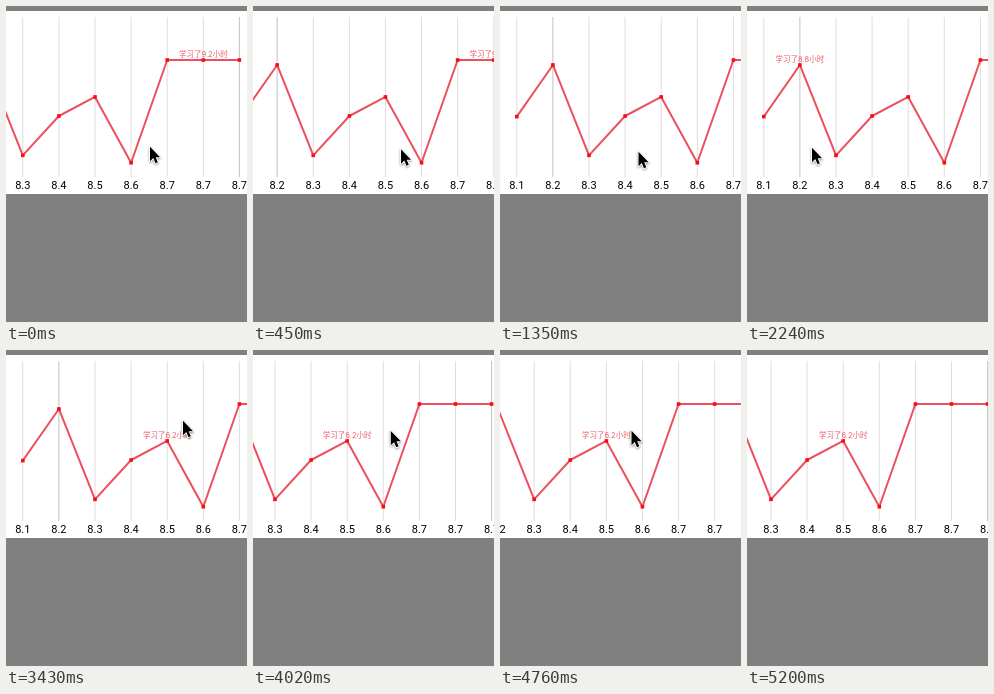
These frames come from a looping animation (241x316 px, 5.85 s). An HTML page:

```html
<!DOCTYPE html>
<html lang="zh">
<head>
<meta charset="utf-8">
<style>
  html, body { margin: 0; width: 100%; height: 100%; overflow: hidden; background: #808080; }
  svg { display: block; width: 241px; height: 316px; }
  text { text-anchor: middle; }
  .day { font: 11px Roboto, Arial, sans-serif; fill: #000; }
  .tip { font: 7.5px Inter, "Noto Sans CJK SC", "Noto Sans CJK", sans-serif; fill: #ee5b69; }
  #cursor { paint-order: stroke; filter: drop-shadow(0 1px 1px rgba(0, 0, 0, .4)); }
</style>
</head>
<body>
<svg viewBox="0 0 241 316">
  <rect width="241" height="316" fill="#808080"/>
  <rect y="5" width="241" height="183" fill="#fff"/>
  <g id="chart"></g>
  <path id="cursor" d="M.5 .8V15.2L3.8 12.1L6 17.2L8.3 16.2L6.2 11.2H10.6Z"
        fill="#000" stroke="#fff" stroke-width="1.8" stroke-linejoin="round"/>
</svg>
<script>
const LOOP = 5850, TICK = 148.5, GAP = 36.1;
const MIN = -55.4, MAX = 16.8, RANGE = MAX - MIN;
const hours = [4.6, 8.8, 1.45, 4.65, 6.2, 0.85, 9.2, 9.2, 9.2];

const px = i => i * GAP;
const py = i => 167.2 - 12.3 * hours[i];
const day = i => '8.' + Math.min(i + 1, 7);

const chart = document.getElementById('chart');
const cursor = document.getElementById('cursor');

function add(tag, attrs, text) {
  const el = document.createElementNS('http://www.w3.org/2000/svg', tag);
  for (const key in attrs) el.setAttribute(key, attrs[key]);
  if (text) el.textContent = text;
  return chart.appendChild(el);
}

hours.forEach((_, i) => add('rect', {
  x: px(i) - 0.5, y: 11, width: 1, height: 160, fill: i % 7 === 1 ? '#c2c2c2' : '#dedede'
}));
add('polyline', {
  points: hours.map((_, i) => `${px(i)},${py(i)}`).join(' '),
  fill: 'none', stroke: '#ec4f5e', 'stroke-width': 2, 'stroke-linejoin': 'round'
});
hours.forEach((_, i) => {
  add('rect', { x: px(i) - 1.8, y: py(i) - 1.8, width: 3.6, height: 3.6, fill: '#f80d12' });
  add('text', { x: px(i), y: 183, class: 'day' }, day(i));
});
const tip = add('text', { class: 'tip' });

const smooth = p => p * p * (3 - 2 * p);
const speedUp = p => p ** 3.8;

// Progress from 0 to 1 between two ticks
function glide(t, from, to, ease = smooth) {
  return ease(Math.min(1, Math.max(0, (t - from) / (to - from))));
}

function pose(t) {
  const fling = glide(t, 0, 6), settle = glide(t, 6, 9);
  const toSecond = glide(t, 10, 15), toFifth = glide(t, 17, 23);
  const dragLeft = glide(t, 23, 25), dragRight = glide(t, 26, 28, speedUp);
  const lastDrag = glide(t, 29, 33), pull = glide(t, 29, 32), leave = glide(t, 32, 35);
  const bounce = 14.7;
  return {
    left: MIN + (RANGE + bounce) * fling - bounce * settle
      + RANGE * (dragRight - dragLeft) - 65 * lastDrag,
    x: 143.5 + 8 * fling - 13.5 * settle - 73.5 * toSecond + 112 * toFifth
      - 41.5 * dragLeft + 32 * dragRight - 36 * pull + 130 * leave,
    y: 140 + 5 * fling - 4 * toSecond - 71 * toFifth
      + 10.5 * dragLeft - 5.5 * dragRight + 5 * pull - 8 * leave,
    pick: t < 14 ? 7 : t < 22 ? 1 : 4
  };
}

function draw(time) {
  const { left, x, y, pick } = pose(Math.floor((time % LOOP) / TICK));
  chart.setAttribute('transform', `translate(${left} 0)`);
  cursor.setAttribute('transform', `translate(${x} ${y})`);
  tip.setAttribute('x', px(pick));
  tip.setAttribute('y', py(pick) - 3.3);
  tip.textContent = `学习了${hours[pick]}小时`;
}

const start = performance.now();
function frame() {
  draw(performance.now() - start);
  requestAnimationFrame(frame);
}
frame();
</script>
</body>
</html>
```
